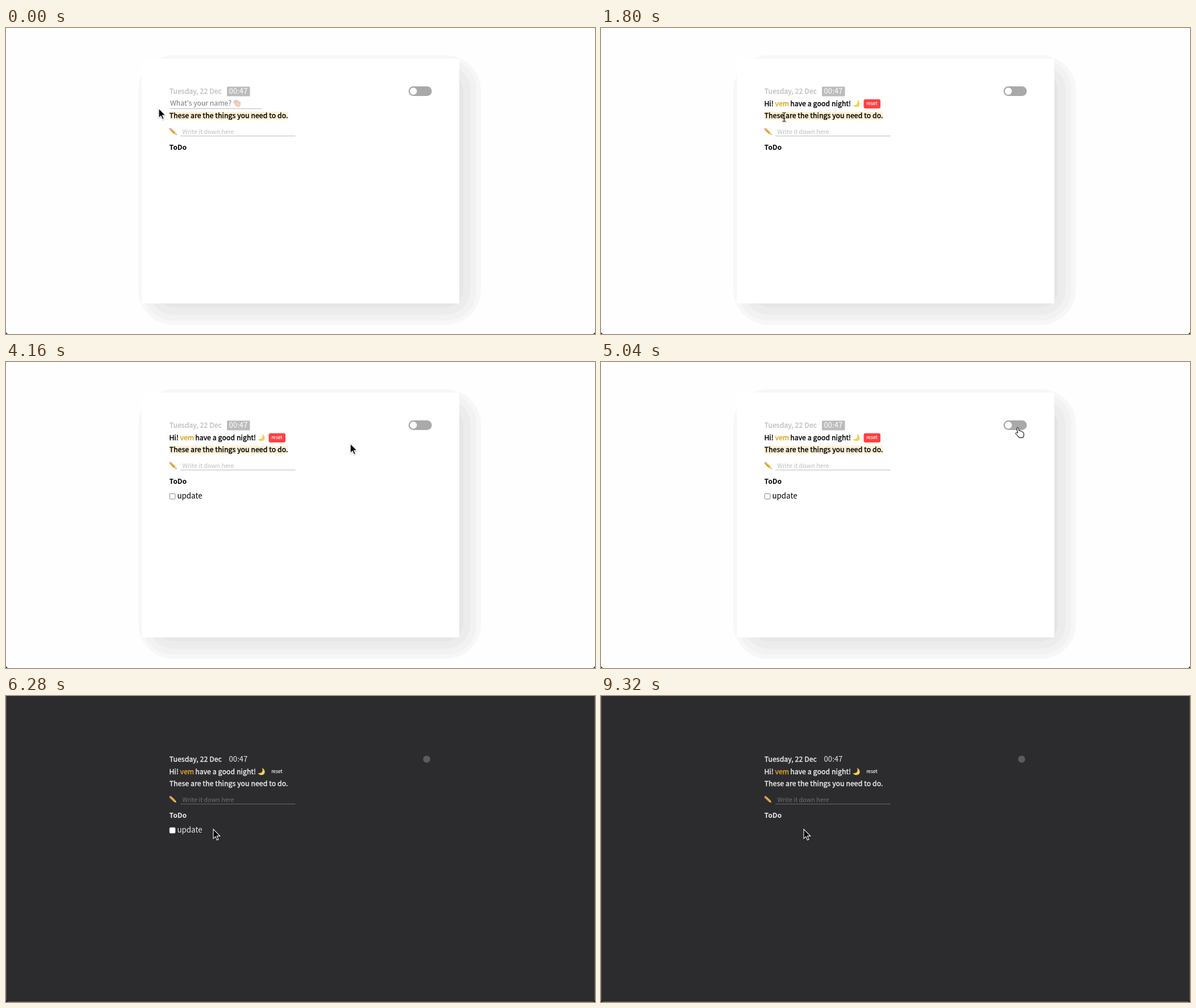
Recreate the animation shown at these times as an HTML page. Size 1037x540 px, loop 9.36 s.

```html
<!DOCTYPE html>
<html lang="en">
<head>
<meta charset="utf-8">
<title>ToDo</title>
<style>
html, body { margin: 0; width: 100%; height: 100%; overflow: hidden; background: #fff; }
svg {
  display: block; width: 1037px; height: 540px;
  font-family: "Noto Sans CJK JP", "Noto Sans CJK KR", "Noto Sans CJK SC", "Noto Sans", sans-serif;
  --page: #fefefe; --ink: #000; --date: #c1c1c1; --clock: #fff; --clock-bg: #bcbcbc;
  --mark: #fdf1d6; --hint: #bdbdbd; --line: #bbb; --pill: #a9a9a9; --knob: #fff;
  --name: #d9a520; --reset: #ff4040; --box-line: #767676;
}
svg.dark {
  --page: #2c2c2e; --ink: #ebebeb; --date: #ebebeb; --clock: #ebebeb; --clock-bg: none;
  --mark: none; --hint: #707072; --line: #6c6c6e; --pill: none; --knob: #5c5c5e;
  --name: #dca32a; --reset: none; --box-line: #fff;
}
text { fill: var(--ink); }
.medium { font-size: 12.2px; letter-spacing: .11px; stroke: currentColor; stroke-width: .42px; color: var(--ink); fill: currentColor; }
.date { color: var(--date); }
.name { color: var(--name); }
.bold { font-size: 12.2px; font-weight: 700; }
.ask { font-size: 12.25px; fill: #777; }
.hint { font-size: 10.7px; fill: var(--hint); }
.clock { font-size: 13.1px; fill: var(--clock); }
.reset { font-size: 8.4px; fill: #fff; stroke: #fff; stroke-width: .15px; }
.item { font-size: 13.33px; }
.dark .light-only, svg:not(.dark) .dark-only { display: none; }
</style>
</head>
<body>
<svg id="stage" viewBox="0 0 1037 540">
  <rect width="1037" height="540" fill="var(--page)"/>
  <g id="glow" class="light-only"></g>
  <rect class="light-only" x="239" y="54" width="559" height="432" rx="1" fill="#fff"/>
  <path class="dark-only" d="M.5 0V539.5H1036.5V0" fill="none" stroke="#57575a"/>
  <path d="M0 536Q.5 539.5 4 540H0ZM1037 536Q1036.5 539.5 1033 540H1037Z" fill="#111"/>

  <text class="medium date" x="287.7" y="116">Tuesday, 22 Dec</text>
  <rect x="389" y="103.5" width="40.5" height="17" rx="1" fill="var(--clock-bg)"/>
  <text class="clock" x="392.6" y="116.2">00:47</text>
  <rect x="708.7" y="103" width="41" height="17" rx="8.5" fill="var(--pill)"/>
  <circle id="knob" cy="111.5" r="6.2" fill="var(--knob)"/>

  <g id="ask">
    <text id="askText" class="ask" x="289" y="137"></text>
    <g id="wave" fill="#f4cfbb" stroke="#d9a58c" stroke-width=".5">
      <path d="M402.2 133.4L400.6 130.4Q401 129.2 402 130L404.2 132.2 401.8 127.9Q402.3 126.6 403.5 127.6L406.2 131 404.6 127.2Q405.3 126 406.4 127.3L408.6 131.2 407.9 128.3Q408.6 127.4 409.5 128.8L410.8 132.4 411.4 130.6Q412.6 129.8 412.8 131.4L412.4 136Q411.6 138.8 408.4 138.8 405.6 138.6 403.8 136.2Z"/>
    </g>
    <path d="M288 142.3H450" stroke="#b5b5b5"/>
  </g>

  <g id="greet">
    <text class="medium" x="287.4" y="137.7">Hi!</text>
    <text class="medium name" x="306.6" y="137.7">vem</text>
    <text class="medium" x="333.2" y="137.7">have a good night!</text>
    <path d="M450.7 127C457 129.3 458 139.2 449.7 139.4 446.8 139.4 444.4 138 443.4 136 449.8 137.6 453.6 132.6 450.7 127Z" fill="#f7cf52"/>
    <rect x="462.5" y="125.7" width="29.5" height="16.2" rx="3" fill="var(--reset)"/>
    <text class="reset" x="467.2" y="136.2">reset</text>
  </g>

  <rect x="287.5" y="147.7" width="209" height="14.6" fill="var(--mark)"/>
  <text class="medium" x="287.7" y="159">These are the things you need to do.</text>

  <g transform="translate(288.3 177.2) rotate(43)">
    <rect y="-1.9" width="2.3" height="3.8" rx="1" fill="#ee8d92"/>
    <rect x="2.2" y="-1.9" width="1.5" height="3.8" fill="#b9bcc0"/>
    <rect x="3.6" y="-1.9" width="8.6" height="3.8" fill="#f5b32f"/>
    <rect x="3.6" y=".6" width="8.6" height="1.3" fill="#d98a1c"/>
    <path d="M12.2-1.9L16.6 0 12.2 1.9Z" fill="#ecc9a0"/>
    <path d="M14.9-.75L16.6 0 14.9.75Z" fill="#333"/>
  </g>
  <text id="entry" class="hint" x="310.6" y="187"></text>
  <path d="M307 190.6H509.5" stroke="var(--line)"/>
  <path id="caret" stroke="#777" d="M0 177V190"/>

  <text class="bold" x="287.6" y="214.9">ToDo</text>
  <g id="todo">
    <g id="open">
      <rect x="288.2" y="232.3" width="9.6" height="9.6" rx="1.5" fill="#fff" stroke="var(--box-line)" stroke-width=".9"/>
      <text class="item" x="301.5" y="241">update</text>
    </g>
    <g id="done">
      <rect x="287.8" y="232" width="10.3" height="10.3" rx="1.5" fill="#3b86e8"/>
      <path d="M290.2 237.3L292.2 239.6 295.8 234.5" fill="none" stroke="#fff" stroke-width="1.5"/>
      <path d="M303 237.3H345.5" stroke="#4b4b4d" stroke-dasharray="4 1.5 5 2 3 1.5"/>
    </g>
  </g>

  <g id="cursor" style="filter: drop-shadow(0 1px 1px rgba(0,0,0,.3))">
    <path id="arrow" d="M0 0V16.6L3.8 13.1 6.5 19.2 9 18.1 6.4 12.1H11.8Z" fill="#000" stroke="#fff" stroke-width="1.1"/>
    <path id="beam" d="M-3.2-8Q-.4-8 0-6.6 .4-8 3.2-8M0-6.8V6.8M-3.2 8Q-.4 8 0 6.6 .4 8 3.2 8M-1.8 2.6H1.8" fill="none" stroke="#222" stroke-width="1.2"/>
    <path id="hand" transform="translate(-4.2 0)" d="M4.5 9.8L2.8 2Q2.6.2 4 .1 5.3 0 5.7 1.8L6.8 6.2Q7.4 5 9.2 5.8L9.6 6.8Q10.6 5.8 12 7.2L12.3 8.1Q14.4 7.6 14.7 9.6L15.1 12.2Q15.2 14.4 13.8 17.6H6.6Q5.4 15 1 11.4 .2 9.8 1.6 9.2 3 9 4.5 9.8Z" fill="#fff" stroke="#000" stroke-width="1"/>
  </g>
</svg>
<script>
const LOOP = 9360, STEP = 40;
const el = id => document.getElementById(id);
const show = (id, on) => { el(id).style.display = on ? '' : 'none'; };

// Stepped soft shadow: [spread, corner radius, colour]
for (const [e, r, fill] of [[22, 62, '#f7f7f7'], [14, 52, '#f2f2f2'], [4, 44, '#ececec'], [-9, 32, '#e6e6e6']]) {
  const band = document.createElementNS('http://www.w3.org/2000/svg', 'rect');
  const box = { x: 255 - e, y: 70 - e, width: 559 + 2 * e, height: 432 + 2 * e, rx: r, fill };
  for (const k in box) band.setAttribute(k, box[k]);
  el('glow').append(band);
}

// Pointer path: time, x, y, shape kept until the next point
const path = [
  [0, 269, 142, 'arrow'], [160, 292, 138, 'beam'], [320, 325, 133, 'beam'],
  [640, 325, 133, ''], [1400, 325, 134, 'beam'], [1800, 322.5, 157, 'beam'],
  [2120, 327, 186, 'beam'], [2600, 327, 186, ''], [3560, 327, 186, 'beam'],
  [3720, 385, 174, 'arrow'], [4000, 540, 152, 'arrow'], [4280, 656, 138, 'arrow'],
  [4520, 656, 138, 'arrow'], [4720, 728, 112, 'hand'], [4880, 744, 112, 'hand'],
  [5040, 733.5, 115.5, 'hand'], [5320, 733.5, 115.5, 'hand'], [5440, 700, 135, 'arrow'],
  [5760, 500, 200, 'arrow'], [6040, 385, 232, 'arrow'], [6200, 385, 232, 'arrow'],
  [6360, 345, 238, 'hand'], [6680, 326, 238, 'hand'], [6960, 326, 238, 'hand'],
  [7320, 326, 246, 'hand'], [7640, 329, 242, 'hand'], [7840, 331, 240, 'hand'],
  [8000, 331, 240, 'hand'], [8520, 338, 237, 'arrow'], [8920, 372, 235, 'arrow'],
  [9320, 357, 235, 'arrow'], [LOOP, 357, 235, 'arrow']
];
const nameKeys = [640, 800, 960], nameSent = 1200;
const itemKeys = [2600, 2680, 2800, 2920, 3080, 3160], itemSent = 3320;
const focused = 2160, darkAt = 5240, checkedAt = 7040, removedAt = 8520;

const typed = (word, keys, t) => word.slice(0, keys.filter(k => k <= t).length);

function pointer(t) {
  const i = path.findIndex((p, n) => n && t < p[0]);
  const [t0, x0, y0, kind] = path[i - 1], [t1, x1, y1] = path[i];
  const u = (t - t0) / (t1 - t0);
  for (const k of ['arrow', 'beam', 'hand']) show(k, k === kind);
  el('cursor').setAttribute('transform', `translate(${x0 + (x1 - x0) * u} ${y0 + (y1 - y0) * u})`);
}

function draw(t) {
  const dark = t >= darkAt;
  el('stage').classList.toggle('dark', dark);
  el('knob').setAttribute('cx', dark ? 740.6 : 717.2);

  const name = typed('vem', nameKeys, t);
  show('ask', t < nameSent);
  show('wave', !name);
  el('askText').textContent = name || "What's your name?";
  show('greet', t >= nameSent);

  const item = t < itemSent ? typed('update', itemKeys, t) : '';
  const entry = el('entry');
  entry.textContent = item || 'Write it down here';
  const since = t < itemSent ? (item ? 0 : t - focused) : t - itemSent;
  show('caret', t >= focused && !dark && Math.floor(since / 480) % 2 === 0);
  const caretX = item ? 310.6 + entry.getComputedTextLength() + .4 : 311.5;
  el('caret').setAttribute('transform', `translate(${caretX} 0)`);

  show('todo', t >= itemSent && t < removedAt);
  show('open', t < checkedAt);
  show('done', t >= checkedAt);
  pointer(t);
}

const start = performance.now();
function tick() {
  const t = (performance.now() - start) % LOOP;
  draw(Math.floor(t / STEP) * STEP);
  requestAnimationFrame(tick);
}
tick();
</script>
</body>
</html>
```
